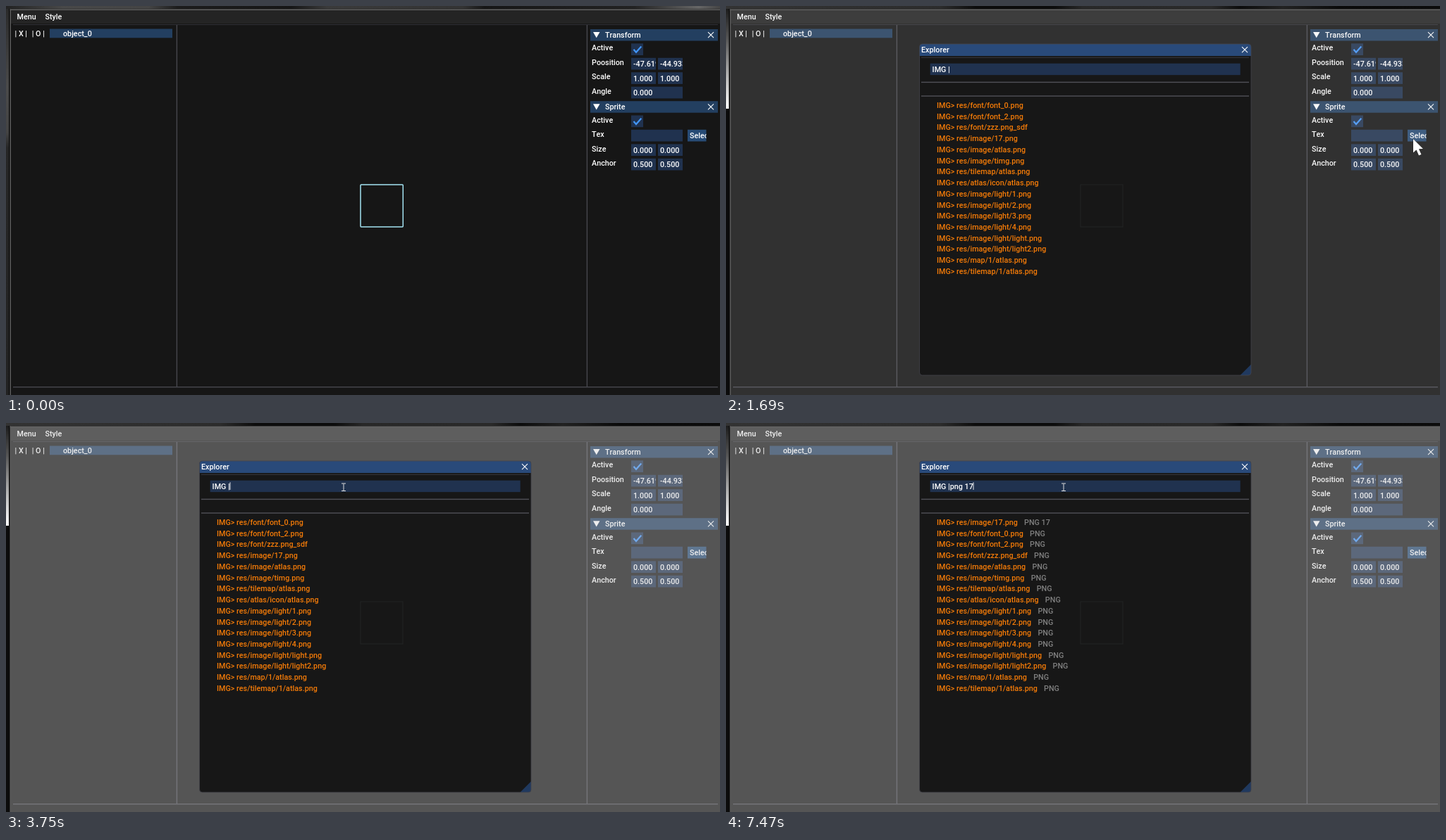
An HTML page with a canvas that plays this animation: 1013 by 553 pixels, repeating every 8 s.

```html
<!DOCTYPE html>
<html>
<head>
<meta charset="utf-8">
<style>
html, body { margin: 0; width: 100%; height: 100%; overflow: hidden; background: #161616; }
canvas { display: block; }
</style>
</head>
<body>
<canvas id="stage" width="1013" height="553"></canvas>
<script>
const LOOP = 8000;
const ctx = document.getElementById('stage').getContext('2d');
ctx.font = '500 10.75px Roboto, sans-serif';
ctx.fontKerning = 'none';

const WHITE = '#fff', HEADER = '#233f60', FIELD = '#20324f', LINE = '#47474e';
const FILES = ['font/font_0', 'font/font_2', 'font/zzz.png_sdf', 'image/17', 'image/atlas', 'image/timg',
  'tilemap/atlas', 'atlas/icon/atlas', 'image/light/1', 'image/light/2', 'image/light/3', 'image/light/4',
  'image/light/light', 'image/light/light2', 'map/1/atlas', 'tilemap/1/atlas']
  .map(name => 'res/' + name + (name.endsWith('_sdf') ? '' : '.png'));
const TYPED = [[4820, 'p'], [4970, 'pn'], [5140, 'png'], [6000, 'png '], [6230, 'png 1'], [7470, 'png 17']];

// Pointer moves: start, end, steps, from x, y, to x, y
const MOVES = [
  [300, 680, 6, 1015, 388, 970, 190],
  [840, 990, 2, 970, 190, 975, 189],
  [1910, 2300, 6, 975, 189, 452, 99],
  [2530, 2830, 5, 452, 98, 454, 91],
  [3060, 3290, 4, 454, 91, 479, 90],
  [3540, 3600, 2, 485, 88, 480, 90.5],
  [3750, 3750, 1, 480, 90.5, 479, 91]
];

function rect(x, y, w, h, color) {
  ctx.fillStyle = color;
  ctx.fillRect(x, y, w, h);
}
function text(str, x, y, color = WHITE) {
  ctx.fillStyle = color;
  ctx.fillText(str, x, y);
}
function path(points, closed) {
  ctx.beginPath();
  for (let i = 0; i < points.length; i += 2) ctx.lineTo(points[i], points[i + 1]);
  if (closed) ctx.closePath();
}
function stroke(color, width) {
  ctx.strokeStyle = color;
  ctx.lineWidth = width;
  ctx.stroke();
}
function fill(color) {
  ctx.fillStyle = color;
  ctx.fill();
}
function clipped(x, y, w, h, draw) {
  ctx.save();
  ctx.beginPath();
  ctx.rect(x, y, w, h);
  ctx.clip();
  draw();
  ctx.restore();
}
function gradient(x, y, w, h, ...stops) {
  const g = w > h ? ctx.createLinearGradient(x, 0, x + w, 0) : ctx.createLinearGradient(0, y, 0, y + h);
  stops.forEach(([at, color]) => g.addColorStop(at, color));
  rect(x, y, w, h, g);
}
function cross(x, y) {
  path([x - 4, y - 4, x + 4, y + 4]);
  stroke(WHITE, 1.1);
  path([x + 4, y - 4, x - 4, y + 4]);
  stroke(WHITE, 1.1);
}
function box(x, y, w, value, color = FIELD) {
  rect(x, y, w, 16.7, color);
  clipped(x, y, w, 17, () => text(value, x + 3, y + 12.3));
}

function backdrop(t) {
  rect(0, 0, 1013, 553, '#0b0b0b');
  if (t < 1220) {
    gradient(0, 0, 1013, 4, [0, '#222'], [.08, '#484848'], [.2, '#444'], [.24, '#1c1c1c'], [.4, '#161616'],
      [.45, '#3a3a3a'], [.64, '#333'], [.67, '#161616'], [.88, '#222'], [.97, '#666'], [1, '#444']);
    gradient(0, 4, 4, 549, [0, '#2a2a2a'], [.2, '#4a4a4a'], [.32, '#444'], [.36, '#262626'], [1, '#222']);
  } else {
    gradient(0, 0, 1013, 4, [0, '#333'], [.3, '#2c2c2c'], [.35, '#0c0c0c'], [.46, '#0c0c0c'], [.5, '#282828'],
      [.68, '#2a2a2a'], [.72, '#0c0c0c'], [.78, '#222'], [.86, '#0a0a0a'], [1, '#0c0c0c']);
    gradient(0, 4, 4, 142, [0, '#1c1c1c'], [.3, '#555'], [.7, '#bbb'], [1, '#fff']);
  }
  rect(4, 4, 1009, 549, '#0a0a0a');
  rect(5.5, 4.5, 1008, 1.5, '#666');
  rect(5.5, 4.5, 1.5, 549, '#5c5c5c');
}

function component(y, title, labels) {
  rect(829, y, 181, 16.5, HEADER);
  path([833, y + 4, 842.5, y + 4, 837.7, y + 12.3], true);
  fill(WHITE);
  text(title, 850, y + 12.2);
  cross(1000, y + 8.2);
  labels.forEach((label, i) => text(label, 831, y + 30.4 + i * 20.45));
  rect(887, y + 20.3, 17, 16.7, FIELD);
  path([890.5, y + 28.8, 894, y + 32.8, 901.3, y + 24.5]);
  stroke('#4296fa', 2.2);
}
function pair(y, a, b) {
  box(887, y, 35, a);
  box(925, y, 35, b);
}

function editor(t) {
  rect(7, 6, 1006, 547, '#161616');
  rect(7, 6, 1006, 19, '#242424');
  text('Menu', 15.5, 19);
  text('Style', 55.5, 19);
  rect(10, 26, 1000, 1, '#303035');
  rect(10, 541, 1000, 1.4, LINE);
  rect(241.7, 27, 1.4, 514, LINE);
  rect(823.7, 27, 1.4, 514, LINE);

  text('| X |', 12.5, 42.6);
  text('| O |', 36.7, 42.6);
  rect(62, 32.5, 174, 12.8, HEADER);
  text('object_0', 81, 42.6);

  ctx.beginPath();
  ctx.roundRect(503, 254, 60.3, 60, 1);
  stroke('#a4e3f2', 1.5);

  component(33, 'Transform', ['Active', 'Poosition', 'Scale', 'Angle']);
  pair(73.8, '-47.619', '-44.933');
  pair(94.2, '1.000', '1.000');
  box(887, 114.7, 73, '0.000');
  component(135.2, 'Sprite', ['Active', 'Tex', 'Size', 'Anchor']);
  box(887, 175.8, 73, '');
  const button = t >= 1540 && t < 1600 ? '#0f87fa' : t >= 1220 && t < 1690 ? '#4296fa' : '#274b75';
  box(967, 175.8, 26.5, 'Select', button);
  pair(196.3, '0.000', '0.000');
  pair(216.8, '0.500', '0.500');
}

function listing(query) {
  const words = query.trim().split(' ').filter(Boolean);
  const rows = FILES.map(file => ({ file, hits: words.filter(word => file.includes(word)) }));
  rows.sort((a, b) => b.hits.length - a.hits.length);
  rows.forEach(({ file, hits }, i) => {
    const line = 'IMG> ' + file, y = 145 + i * 15.73;
    text(line, 299, y, '#f47b08');
    text(hits.join(' ').toUpperCase(), 299 + ctx.measureText(line).width + 9.3, y, '#808080');
  });
}

function explorer(t) {
  const typed = TYPED.filter(([at]) => t >= at).pop();
  const query = typed ? typed[1] : '';
  ctx.beginPath();
  ctx.roundRect(274.5, 54, 470.5, 471, 4);
  fill('#171717');
  ctx.save();
  ctx.clip();
  rect(274, 54, 472, 17, '#294a7a');
  path([745, 509.5, 745, 525, 729.5, 525], true);
  fill('#20395f');
  ctx.restore();
  ctx.beginPath();
  ctx.roundRect(274.5, 54, 470.5, 471, 4);
  stroke('#45454c', .8);
  text('Explorer', 277, 66.3);
  cross(736, 62.2);

  rect(277, 72.8, 465, .9, '#3c3c43');
  rect(277, 107.7, 465, 1.4, '#505057');
  rect(277, 127.3, 465, 1.4, '#505057');
  ctx.strokeStyle = '#232425';
  ctx.lineWidth = 1;
  ctx.strokeRect(503, 254, 60, 60);

  rect(289.7, 81.7, 440, 16.4, FIELD);
  const value = 'IMG |' + query, end = 292.6 + ctx.measureText(value).width;
  if (t >= 2680 && t < 3540) rect(292.3, 83, end - 292, 13.7, 'rgba(66,150,250,.4)');
  text(value, 292.6, 94);
  const blinkOff = t >= 4690 && t < 4820 || t >= 7240 && t < 7470;
  if (t >= 2680 && !blinkOff) rect(end - .2, 84.3, .9, 10.7, WHITE);
  listing(query);
}

function pointer(t) {
  const move = MOVES.filter(m => t >= m[0]).pop();
  if (!move) return;
  const [start, stop, steps, x0, y0, x1, y1] = move;
  const span = Math.max(stop - start, 1);
  const step = Math.min(steps, 1 + Math.floor((t - start) / span * (steps - 1) + .001));
  const p = 1 - (1 - step / steps) ** 1.5;
  ctx.save();
  ctx.translate(x0 + (x1 - x0) * p, y0 + (y1 - y0) * p);
  if (t < 2530) {
    path([0, 0, 0, 19.5, 4.5, 15.5, 8, 23.5, 11.5, 22, 8, 14.2, 14, 14], true);
    stroke('rgba(20,20,20,.6)', 1);
    fill(WHITE);
  } else {
    rect(-.5, -4.5, 1, 10, '#ddd');
    for (const y of [-5.5, 5]) rect(-3, y, 6, 1, '#ddd');
  }
  ctx.restore();
}

function frame(now) {
  const t = now % LOOP;
  backdrop(t);
  editor(t);
  if (t >= 1690) {
    const dim = t < 1760 ? .145 : t < 1910 ? .325 : .35;
    rect(7, 6, 1006, 547, `rgba(204,204,204,${dim})`);
    explorer(t);
  }
  pointer(t);
  requestAnimationFrame(frame);
}
requestAnimationFrame(frame);
</script>
</body>
</html>
```
